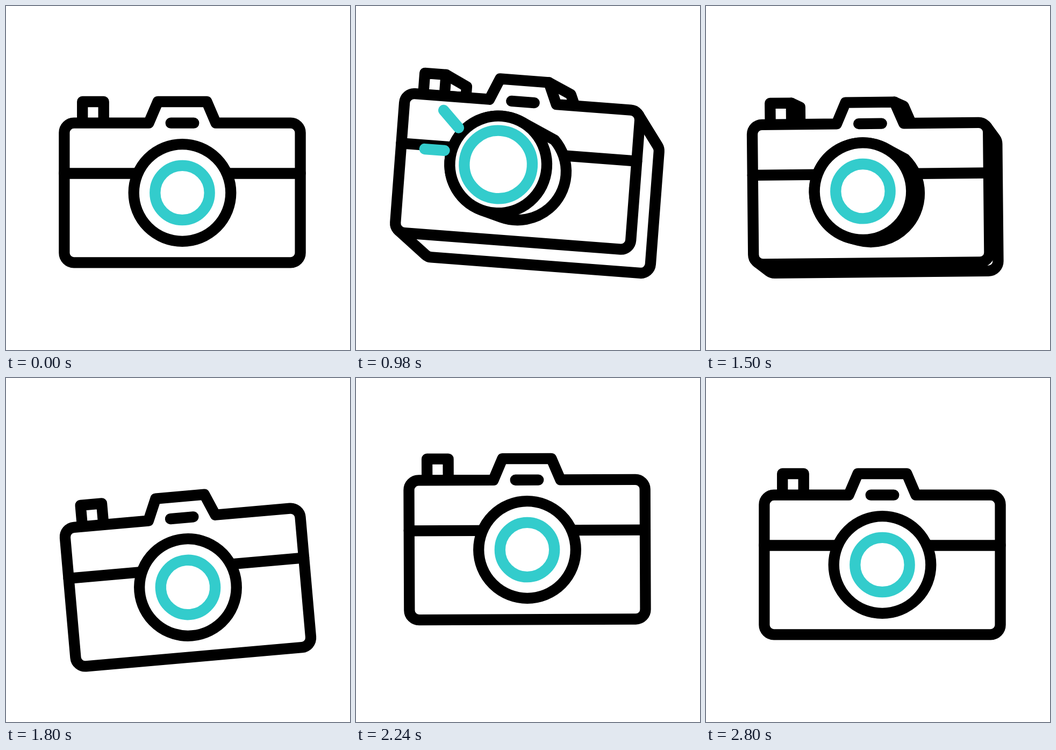
Animation, 640 px wide and 640 px high, one loop 3000 ms. Source, as an HTML page with a canvas:

```html
<!DOCTYPE html>
<html lang="en">
<head>
<meta charset="utf-8">
<title>Camera</title>
<style>
  html, body { margin: 0; width: 100%; height: 100%; overflow: hidden; background: #fff; }
  canvas { display: block; width: 100vmin; height: 100vmin; }
</style>
</head>
<body>
<canvas id="stage" width="640" height="640"></canvas>
<script>
const ctx = document.getElementById('stage').getContext('2d');
const LOOP = 3000, STEP = 20, STROKE = 20.3;
const CYAN = '#33cccc', BLACK = '#000', WHITE = '#fff';
const HALF = Math.PI / 2;

// Shapes are placed relative to the body centre
const WIDE = 219.6, TALL = 129.8, CORNER = 18;
const CX = WIDE - CORNER, CY = TALL - CORNER;
const CREST = -169.5, HUMP = 45.5, HUMP_FOOT = 62.5;
const BUTTON_LEFT = -185.8, BUTTON_RIGHT = -146.3;
const LENS = 90.3;

const ramp = (t, from, to) => Math.min(1, Math.max(0, (t - from) / (to - from)));

// Turn to the side, drift on, drop to the right, lift, settle
function pose(t) {
  const turn = ramp(t, 120, 440);
  const drift = ramp(t, 440, 1190) ** 1.5;
  const drop = ramp(t, 1190, 1800);
  const lift = ramp(t, 1800, 2260);
  const settle = ramp(t, 2260, 2800);
  const swing = 1 - (1 - drop) ** 1.13;
  return {
    x: 328 - 25.8 * turn - 2.5 * drift + 13.8 * drop + 25 * drop ** 12 - 20.9 * lift + 10.4 * settle,
    y: 347.5 - 37.3 * turn - 3.8 * drift + 83.1 * drop - 73.2 * lift + 31.2 * settle,
    tilt: 3.45 * turn + 1.45 * drift - 9.9 * swing + 5 * lift,
    depth: (0.99 * turn + 0.23 * drift) * (1 - drop) ** 1.4
  };
}

function paint(build, color = BLACK) {
  ctx.beginPath();
  build();
  ctx.fillStyle = WHITE;
  ctx.fill();
  ctx.strokeStyle = color;
  ctx.stroke();
}

function polyline(points, color) {
  paint(() => points.forEach(([x, y]) => ctx.lineTo(x, y)), color);
}

function circle(x, y, r, color) {
  paint(() => ctx.arc(x, y, r, 0, 4 * HALF), color);
}

// Right and lower sides; the far corners are pulled in a little
function bodySides(depth) {
  const dx = 35.3 * depth, dy = 36.7 * depth, inset = 12 * depth;
  const a = Math.atan2(dy + inset, dx) - HALF;
  const b = Math.atan2(dy, dx + inset) + HALF;
  paint(() => {
    ctx.arc(CX, -CY, CORNER, a, a);
    ctx.arc(CX + dx, -CY + dy + inset, CORNER, a, 0);
    ctx.arc(CX + dx, CY + dy, CORNER, 0, HALF);
    ctx.arc(-CX + dx + inset, CY + dy, CORNER, HALF, b);
    ctx.arc(-CX, CY, CORNER, b, b);
  });
}

function topSides(depth) {
  const dx = 35.3 * depth, dy = 17 * depth, hx = 37.5 * depth;
  polyline([[HUMP, CREST], [HUMP + hx, CREST + dy], [HUMP_FOOT + hx, dy - TALL], [HUMP_FOOT, -TALL]]);
  polyline([[BUTTON_RIGHT, CREST], [BUTTON_RIGHT + dx, CREST + dy], [BUTTON_RIGHT + dx, -TALL], [BUTTON_RIGHT, -TALL]]);
}

function front() {
  polyline([[BUTTON_LEFT, -TALL], [BUTTON_LEFT, CREST], [BUTTON_RIGHT, CREST], [BUTTON_RIGHT, -TALL]]);
  paint(() => {
    ctx.moveTo(-HUMP_FOOT, -TALL);
    ctx.lineTo(-HUMP, CREST);
    ctx.lineTo(HUMP, CREST);
    ctx.lineTo(HUMP_FOOT, -TALL);
    ctx.arc(CX, -CY, CORNER, -HALF, 0);
    ctx.arc(CX, CY, CORNER, 0, HALF);
    ctx.arc(-CX, CY, CORNER, HALF, 2 * HALF);
    ctx.arc(-CX, -CY, CORNER, 2 * HALF, 3 * HALF);
    ctx.closePath();
  });
  polyline([[-WIDE, -36], [WIDE, -36]]);
  polyline([[-21.3, -TALL], [21.3, -TALL]]);
}

function lensBarrel(x, y) {
  const a = Math.atan2(-y, -x);
  paint(() => {
    ctx.arc(0, 0, LENS, a - HALF + 0.52, a + HALF);
    ctx.arc(x, y, LENS, a + HALF, a + 3 * HALF + 0.17);
    ctx.closePath();
  });
}

function ray(outerX, outerY, length, angle, tail, head) {
  const at = u => [
    outerX + Math.cos(angle) * length * (1 - u),
    outerY + Math.sin(angle) * length * (1 - u)
  ];
  polyline([at(tail), at(head)], CYAN);
}

function draw(t) {
  const { x, y, tilt, depth } = pose(t);
  const pulse = Math.sin(Math.PI * ramp(t, 780, 1180));
  const head = ramp(t, 860, 970), tail = ramp(t, 1000, 1120);

  ctx.setTransform(1, 0, 0, 1, 0, 0);
  ctx.fillStyle = WHITE;
  ctx.fillRect(0, 0, 640, 640);
  ctx.translate(x, y);
  ctx.rotate(tilt * Math.PI / 180);
  ctx.lineWidth = STROKE;
  ctx.lineCap = ctx.lineJoin = 'round';

  if (depth > 0) {
    bodySides(depth);
    topSides(depth);
  }
  front();

  const lensX = -32.6 * depth, lensY = -9 * depth;
  if (depth > 0) lensBarrel(lensX, lensY);
  ctx.translate(lensX, lensY);
  circle(0, 0, LENS);
  circle(0, 0, 50.7 + 12.6 * pulse, CYAN);
  if (head > tail) {
    ray(-109, -93, 43, HALF / 2, tail, head);
    ray(-138.8, -18.5, 37, 0, tail, head);
  }
}

const start = performance.now();
function frame() {
  const t = (performance.now() - start) % LOOP;
  draw(Math.floor(t / STEP) * STEP);
  requestAnimationFrame(frame);
}
frame();
</script>
</body>
</html>
```
